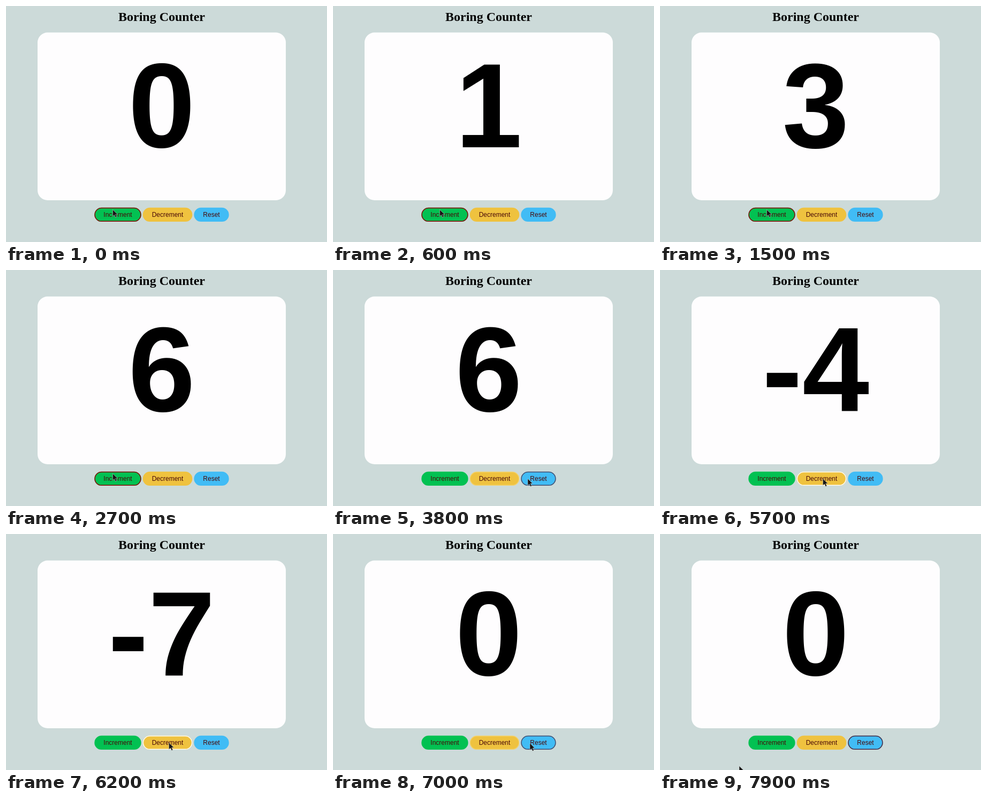
Write an HTML page that moves like this. It is 600 px wide and 441 px high and loops after 8000 ms.

```html
<!DOCTYPE html>
<html lang="en">
<head>
<meta charset="utf-8">
<title>Boring Counter</title>
<style>
  html, body { margin: 0; width: 100%; height: 100%; overflow: hidden; background: #ccdad9; }
  svg { display: block; width: 600px; height: 441px; }
  text { text-anchor: middle; }
  .title { font: bold 24px "Liberation Serif", Times, serif; }
  .value { font: bold 225px "Liberation Sans", Arial, sans-serif; }
  .label { font: 12px "Liberation Sans", Arial, sans-serif; fill: #480808; }
</style>
</head>
<body>
<svg viewBox="0 0 600 441">
  <rect width="600" height="441" fill="#ccdad9"/>
  <text class="title" x="291" y="27.7">Boring Counter</text>
  <rect x="59" y="49.5" width="464" height="313.5" rx="18.75" fill="#fefdfe"/>
  <text class="value" id="value" x="291" y="264.4">0</text>
  <g id="buttons"></g>
  <path id="cursor" d="M0 0V12.6L3 9.9L5 14.6L7.3 13.6L5.3 9H9.2Z" fill="#161616" stroke="#ddd" stroke-opacity=".7" stroke-width=".7"/>
</svg>
<script>
const LOOP = 8000, STEP = 100, FADE = 300, TRAVEL = 700;
const CENTER = 291, TOP = 376.8, HEIGHT = 26.3, PADDING = 17, GAP = 3, BORDER = 1.5;
const FIRST_RESET = 4100, FIRST_DECREMENT = 5100, LAST_RESET = 7000;

const buttons = [
  { label: "Increment", fill: "#02c152", ring: "#8a0808" },
  { label: "Decrement", fill: "#efc23f", ring: "#fffdf5" },
  { label: "Reset", fill: "#41bcf5", ring: "#4a2a40" }
];
const reset = buttons[2];

// Places where the pointer rests until it leaves for the next one
const stops = [
  { x: 199.5, y: 380.5, leave: 3000 },
  { x: 364, y: 390, leave: 4400 },
  { x: 304.5, y: 390, leave: 6300 },
  { x: 368, y: 391, leave: 7200 },
  { x: 148, y: 433.5, leave: LOOP }
];

const $ = id => document.getElementById(id);
const clamp = v => Math.max(0, Math.min(1, v));
const ease = u => u * u * (3 - 2 * u);
const mix = (a, b, u) => a + (b - a) * u;

function add(tag, attrs, text = "") {
  const el = document.createElementNS("http://www.w3.org/2000/svg", tag);
  for (const key in attrs) el.setAttribute(key, attrs[key]);
  el.textContent = text;
  return $("buttons").appendChild(el);
}

function pill(x, width, inset, attrs) {
  const height = HEIGHT - 2 * inset;
  return add("rect", {
    x: x + inset, y: TOP + inset, width: width - 2 * inset, height, rx: height / 2, ...attrs
  });
}

function layoutButtons() {
  for (const b of buttons) {
    const probe = add("text", { class: "label" }, b.label);
    b.width = probe.getComputedTextLength() + 2 * PADDING;
    probe.remove();
  }
  const total = buttons.reduce((sum, b) => sum + b.width + GAP, -GAP);
  let x = CENTER - total / 2;
  for (const b of buttons) {
    b.x = x;
    pill(x, b.width, 0, { fill: b.fill });
    b.border = pill(x, b.width, BORDER / 2, { fill: "none", stroke: b.ring, "stroke-width": BORDER });
    add("text", { class: "label", x: x + b.width / 2, y: 394 }, b.label);
    x += b.width + GAP;
  }
}

function countAt(t) {
  if (t < FIRST_RESET) return Math.max(0, Math.min(6, Math.floor((t - 200) / 400)));
  if (t < FIRST_DECREMENT || t >= LAST_RESET) return 0;
  return -Math.min(7, 1 + Math.floor((t - FIRST_DECREMENT) / 170));
}

function pointerAt(t) {
  const i = stops.findIndex(s => t < s.leave);
  const to = stops[i], from = stops[i - 1] || to;
  const u = ease(clamp((t - from.leave) / TRAVEL));
  return { x: mix(from.x, to.x, i ? u : 1), y: mix(from.y, to.y, i ? u : 1) };
}

function isActive(b, t) {
  if (b === reset && t >= LAST_RESET) return true;
  const p = pointerAt(t);
  return p.x >= b.x && p.x <= b.x + b.width && p.y >= TOP && p.y <= TOP + HEIGHT;
}

// The border fades in and out with the recent share of active time
function ringAt(b, t) {
  let active = 0, samples = 0;
  for (let back = 0; back <= FADE; back += STEP, samples++) active += isActive(b, t - back);
  return active / samples;
}

function render(t) {
  const p = pointerAt(t);
  $("value").textContent = countAt(t);
  $("cursor").setAttribute("transform", `translate(${p.x} ${p.y})`);
  for (const b of buttons) b.border.setAttribute("opacity", ringAt(b, t));
}

const start = performance.now();
function frame() {
  const t = (performance.now() - start) % LOOP;
  render(Math.floor(t / STEP) * STEP);
  requestAnimationFrame(frame);
}
layoutButtons();
render(0);
requestAnimationFrame(frame);
</script>
</body>
</html>
```
